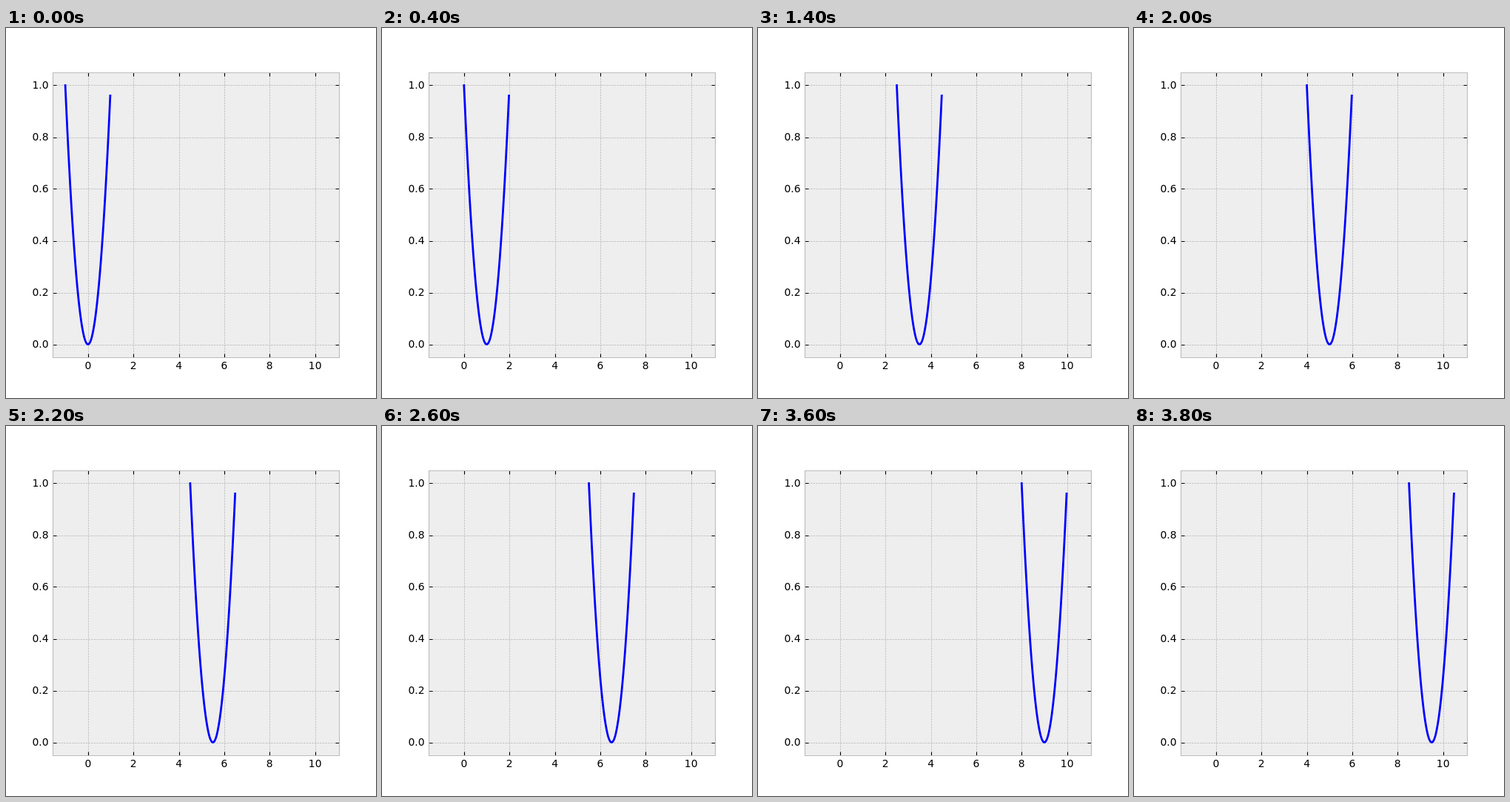
An HTML page that plays this animation: 500x500 px, repeating every 4000 ms.

```html
<!DOCTYPE html>
<html lang="en">
<head>
<meta charset="utf-8">
<title>Moving parabola</title>
<style>
  html, body { margin: 0; width: 100%; height: 100%; overflow: hidden; background: #fff; }
  svg { display: block; width: 500px; height: 500px; }
  text { font: 13.89px "DejaVu Sans", sans-serif; }
  path { fill: none; }
  .grid { stroke: #b2b2b2; stroke-width: 0.69; stroke-dasharray: 2.57 1.11; }
  .curve { stroke: #00f; stroke-width: 2.78; stroke-linejoin: round; stroke-linecap: square; }
  .tick { stroke: #000; stroke-width: 1.11; }
  .frame { stroke: #bcbcbc; stroke-width: 1.11; }
</style>
</head>
<body>
<svg id="plot" viewBox="0 0 500 500"></svg>
<script>
const plot = document.getElementById("plot");
const box = { left: 63.5, right: 450.5, top: 60.5, bottom: 445.5 };
const STEP_MS = 200, STEPS = 20, SHIFT = 0.5, TICK = 5;

// Data to pixels: data fill the axes apart from a 5% margin.
const unitX = 387.5 / 1.1 / 11.48;
const toX = x => 62.5 + 387.5 / 22 + (x + 1) * unitX;
const toY = y => 427.5 - 350 * y;

function add(name, attrs, text = "") {
  const node = document.createElementNS("http://www.w3.org/2000/svg", name);
  for (const key in attrs) node.setAttribute(key, attrs[key]);
  node.textContent = text;
  plot.append(node);
  return node;
}
const path = (cls, d) => add("path", { class: cls, d });

const columns = [0, 2, 4, 6, 8, 10].map(value => ({ value, at: Math.round(toX(value)) + 0.5 }));
// Rows fall on half pixels; these are their pixel-aligned positions.
const rows = [428.5, 358.5, 288.5, 217.5, 148.5, 77.5].map((at, i) => ({ value: i / 5, at }));

add("rect", {
  x: box.left, y: box.top,
  width: box.right - box.left, height: box.bottom - box.top, fill: "#eee"
});
for (const { at } of columns) path("grid", `M${at} ${box.bottom}V${box.top}`);
for (const { at } of rows) path("grid", `M${box.left} ${at}H${box.right}`);

let points = "";
for (let i = 0; i < 100; i++) {
  const x = -1 + i * 0.02;
  points += `${i ? "L" : "M"}${toX(x).toFixed(3)} ${toY(x * x).toFixed(3)}`;
}
const curve = path("curve", points);

for (const { value, at } of columns) {
  path("tick", `M${at} ${box.bottom}v${-TICK}M${at} ${box.top}v${TICK}`);
  add("text", { x: toX(value), y: 461, "text-anchor": "middle" }, value);
}
for (const { value, at } of rows) {
  path("tick", `M${box.left} ${at}h${TICK}M${box.right} ${at}h${-TICK}`);
  add("text", { x: 57.6, y: toY(value) + 4.5, "text-anchor": "end" }, value.toFixed(1));
}
path("frame", `M${box.left} ${box.top}H${box.right}V${box.bottom}H${box.left}Z`);

const start = performance.now();
function draw(now) {
  const step = Math.floor(Math.max(0, now - start) / STEP_MS) % STEPS;
  curve.setAttribute("transform", `translate(${step * SHIFT * unitX} 0)`);
  requestAnimationFrame(draw);
}
draw(start);
</script>
</body>
</html>
```
